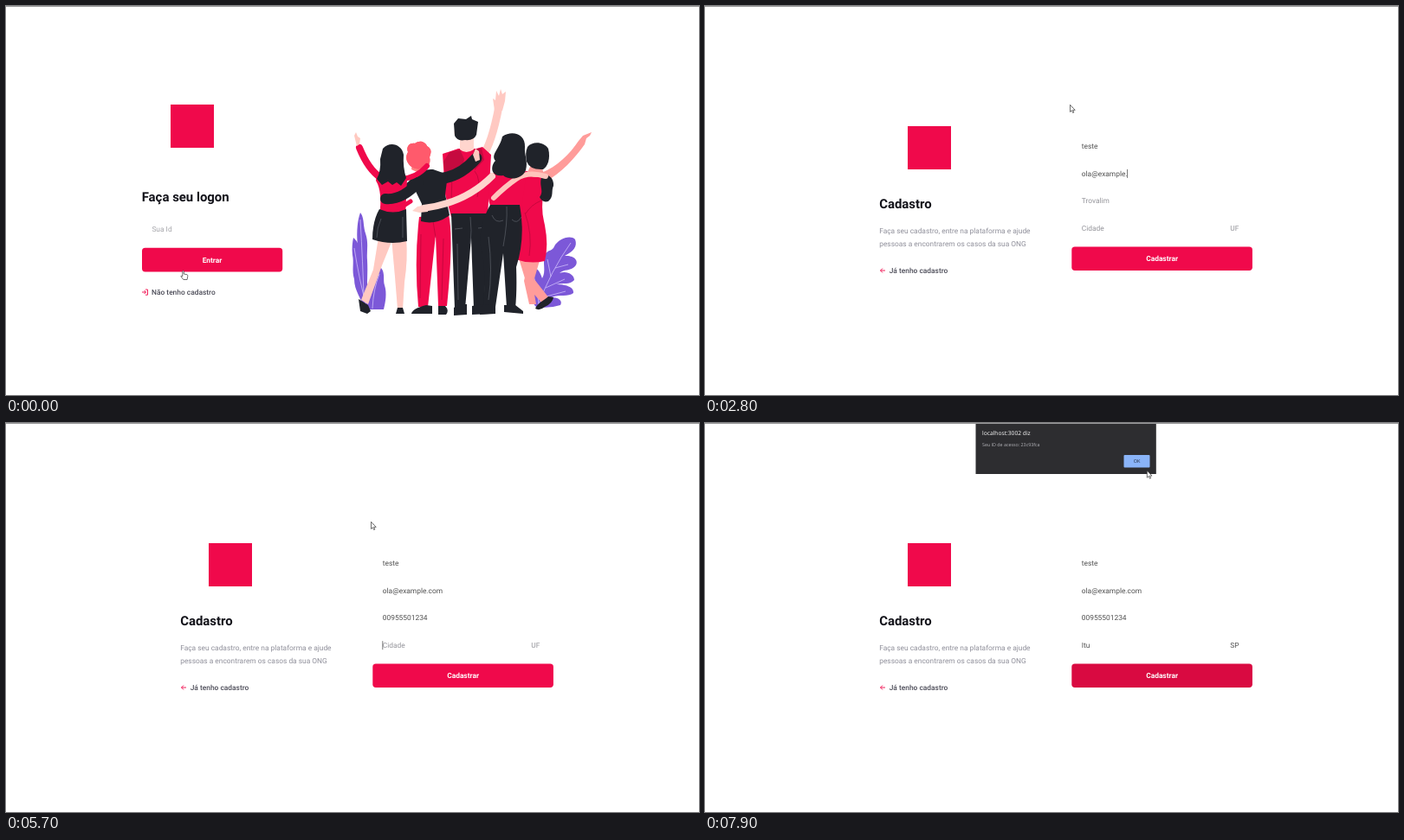
An HTML page for the animation above (8 s loop, 800 px wide and 450 px high).

```html
<!DOCTYPE html>
<html lang="pt">
<head>
<meta charset="utf-8">
<style>
html, body { margin: 0; width: 100%; height: 100%; overflow: hidden; background: #fff; }
svg { display: block; width: 800px; height: 450px; }
text { font: 400 8.4px Roboto, sans-serif; fill: #737380; white-space: pre; text-rendering: geometricPrecision; }
.title { font-size: 14.93px; font-weight: 700; fill: #13131a; }
.link { font-weight: 500; fill: #4b4b57; }
.button { font-weight: 700; fill: #fff; text-anchor: middle; }
.body { fill: #8f8f9a; }
.field { fill: #939399; }
.field.typed { fill: #505050; }
#dialog text { font-family: "Open Sans", sans-serif; }
.icon { fill: none; stroke: #f0094b; stroke-width: .9; }
.red { fill: #f0094b; } .shade { fill: #c60a3f; } .dark { fill: #20232a; } .purple { fill: #7c58d8; }
.peach { fill: #ffc9c0; } .pale { fill: #ffd5cd; } .coral { fill: #ff9c9a; }
.limb { fill: none; stroke-linecap: round; stroke-linejoin: round; }
.seam { fill: none; stroke: #666a73; stroke-width: .6; }
.fold { fill: none; stroke: #b50638; stroke-width: .7; }
.vein { fill: none; stroke: #d8cbff; stroke-width: .7; }
</style>
</head>
<body>
<svg viewBox="0 0 800 450">
  <defs>
    <pattern id="dots" width="3" height="3" patternUnits="userSpaceOnUse" patternTransform="rotate(30)">
      <circle cx="1" cy="1" r=".45" fill="#e02a50"/>
    </pattern>
  </defs>

  <g id="login">
    <rect class="red" x="190" y="114" width="50" height="50"/>
    <text class="title" x="156.7" y="226.2">Faça seu logon</text>
    <text x="168.4" y="261.2" style="fill:#a5a5aa">Sua Id</text>
    <rect class="red" x="157" y="279.8" width="162.2" height="27.6" rx="3.7"/>
    <text class="button" x="238" y="296.6">Entrar</text>
    <path class="icon" d="M161 328h2.500v6.200h-2.500M157 331h4.500M159.500 329l2 2-2 2"/>
    <text class="link" x="168" y="334.1">Não tenho cadastro</text>

    <g id="leaves">
      <path class="purple" d="M409 239C414 245 412 255 415 263C419 275 416 283 417 294C418 312 416 330 416 346L411 320C406 306 405 294 407 283C404 268 405 250 409 239Z"/>
      <path class="purple" d="M401 268C406 272 409 279 409 287C414 296 412 306 415 315C420 327 421 340 419 351H414C410 338 402 329 402 316C399 306 402 297 400 288C399 280 400 273 401 268Z"/>
      <path class="purple" d="M433 303C438 309 435 317 437 323C440 332 438 343 436 351H415C413 340 417 331 419 323C421 312 427 306 433 303Z"/>
      <path class="vein" d="M409 247Q412 300 413 336M402 280Q408 318 416 347M431 310Q424 328 423 350"/>
      <path class="purple" d="M612 348C605 341 612 336 607 328C603 318 604 307 609 304C614 302 617 309 619 315C624 306 619 298 622 288C626 281 631 284 633 278C637 270 651 264 657 270C660 278 655 284 645 289C656 288 662 295 657 301C652 307 644 304 639 309C648 306 656 311 656 317C651 323 643 320 635 322C646 322 656 325 655 332C649 337 639 333 630 337C638 337 643 341 640 346Q628 350 612 348Z"/>
      <path class="vein" d="M614 347Q629 306 652 274M629 313L625 293M634 303L649 299M623 326L645 316M620 337L646 330M615 345Q613 325 609 312"/>
    </g>

    <g id="friend5">
      <path class="coral" d="M592 292H604L609 315 627 338 620 345 602 325ZM604 291H617L608 322 612 345H604L598 318Z"/>
      <path class="dark" d="M611 350C614 343 621 341 626 336L632 337Q631 344 622 348Q616 353 611 350Z"/>
      <path class="coral" d="M618 193C636 186 651 171 661 156L666 150 676 146 674 150 670 153 668 160C657 176 641 193 622 204Z"/>
      <path class="red" d="M588 197L600 191 614 192 624 204Q616 228 621 249Q627 275 622 295Q605 299 588 293L587 244Z"/>
      <path class="coral" d="M607 182H617L621 194Q611 202 601 194Z"/>
      <path class="dark" d="M602 163C608 156 621 157 626 165C629 177 625 186 620 189Q605 190 601 180Q599 170 602 163Z"/>
      <path class="dark" d="M619 196C627 193 633 201 632 208C629 214 633 220 626 226Q619 228 616 221C622 214 614 207 619 196Z"/>
      <path class="fold" d="M600 240Q606 230 618 225M599 239Q608 264 604 289"/>
    </g>

    <g id="friend3">
      <path class="limb" d="M549 176Q561 159 569 116" stroke="#ffc9c2" stroke-width="9"/>
      <path d="M564 121L562 107 565 109 566 98 569 104 571 96 573 102 577 99 576 110 573 121Z" fill="#ffc9c2"/>
      <path class="red" d="M504 171L522 165H543L550 163 560 172 556 244H514L507 218Z"/>
      <path class="shade" d="M512 169L524 166 529 177 526 190 507 196 505 180ZM540 166L549 164 552 178 541 190Z"/>
      <path class="pale" d="M524 149H540V166Q531 172 524 166ZM519 142Q515 148 521 152Z"/>
      <path class="dark" d="M518 150L517 136 522 130 531 131 537 127 538 131 545 134 543 149Q540 156 530 155Q521 157 518 150Z"/>
      <path class="dark" d="M514 240H556L552 350H540L537 268 530 350H518Z"/>
      <path class="seam" d="M536 244Q538 260 536 275M518 258L527 257M545 257L554 256M521 275L522 340"/>
      <path class="dark" d="M517 358V349L523 345H532V357ZM538 357V347L550 345 559 356Z"/>
      <path class="fold" d="M541 191Q549 200 544 221M515 195L514 227"/>
    </g>

    <g id="friend2">
      <path class="red" d="M477 244L511 241Q517 268 509 347H499L496 265 487 348H476Q471 294 477 244Z"/>
      <path class="fold" d="M493 249L496 268M479 264L478 338M505 269L503 340"/>
      <path class="dark" d="M468 356Q469 350 485 346L492 347V356ZM499 347H507Q512 352 508 357H499Z"/>
      <path class="limb" d="M497 200Q523 199 543 176" stroke="#20232a" stroke-width="13"/>
      <path class="peach" d="M539 172L542 165 546 168 547 178 542 180Z"/>
      <path class="dark" d="M466 200Q476 188 493 189L510 195 507 218 512 242Q496 254 479 249L480 229Z"/>
      <path class="limb" d="M474 203Q456 222 442 224" stroke="#20232a" stroke-width="13"/>
      <path d="M469 180H486V189Q477 195 468 189Z" fill="#ff817f"/>
      <path id="curls" fill="#ff5a6c" d="M465 183C460 176 463 171 464 169C461 161 468 158 472 159C478 154 485 158 486 162C493 166 490 171 489 175C491 183 486 188 480 188Q470 190 465 183Z"/>
      <use href="#curls" style="fill:url(#dots)"/>
    </g>

    <g id="friend4">
      <path class="red" d="M557 194L583 190 600 199 595 235H560Q554 219 557 194Z"/>
      <path class="limb" d="M561 197Q530 228 482 234" stroke="#ffd5cd" stroke-width="8"/>
      <path class="pale" d="M486 230L475 232 469 237 477 239 487 238Z"/>
      <path class="limb" d="M623 197Q602 191 589 200T563 222" stroke="#ffc4bc" stroke-width="6"/>
      <path class="dark" d="M559 230H593Q600 268 589 302Q590 330 588 349H578L574 286 565 348H551Q555 299 547 275Q547 251 559 230Z"/>
      <path class="seam" d="M578 232Q579 251 574 278M561 242Q565 252 574 248M584 247Q590 253 595 244M557 267Q562 306 557 340"/>
      <path class="dark" d="M547 357V349Q554 343 565 346V356ZM575 354V346H588L597 353V356Z"/>
      <path class="dark" d="M573 151C584 143 600 148 599 163C598 172 603 179 600 190C595 202 579 201 574 196C559 198 559 185 565 179C559 172 570 165 573 151Z"/>
    </g>

    <g id="friend1">
      <path class="limb" d="M433 199Q418 189 408 164" stroke="#f0094b" stroke-width="8"/>
      <path class="peach" d="M405 162L402 150 404 146 406 151 409 153 408 160Z"/>
      <path id="legs" class="peach" d="M430 268H447L434 300 418 345 410 340 424 305ZM445 268H462Q464 294 460 319L458 350H452L449 313Z"/>
      <use href="#legs" style="fill:url(#dots)" opacity=".2"/>
      <path class="red" d="M428 193L457 188 463 201 461 244H431Q435 215 427 202Z"/>
      <path class="limb" d="M456 200Q474 199 486 185" stroke="#f0094b" stroke-width="6"/>
      <path class="limb" d="M476 204Q457 225 438 223" stroke="#20232a" stroke-width="12"/>
      <path class="limb" d="M435 232Q449 239 467 226" stroke="#f0094b" stroke-width="5"/>
      <path class="dark" d="M431 235Q447 242 462 235L463 272Q443 277 423 270Q423 249 431 235Z"/>
      <path class="seam" d="M433 246Q428 257 428 268M458 244L458 268"/>
      <path class="dark" d="M435 165C443 156 457 160 459 172Q458 187 462 199L456 208 451 204 446 207 441 203 434 207 428 200Q433 191 432 177Z"/>
      <path class="dark" d="M407 339L418 346 421 353 417 356 409 353ZM452 349H458L460 356H450Z"/>
    </g>
  </g>

  <g id="signup">
    <rect class="red" x="234" y="139" width="50" height="50"/>
    <text class="title" x="201.2" y="234.3">Cadastro</text>
    <text class="body" x="201.2" y="263">Faça seu cadastro, entre na plataforma e ajude</text>
    <text class="body" x="201.2" y="278">pessoas a encontrarem os casos da sua ONG</text>
    <path class="icon" d="M208 306h-5.500M205 303.500l-2.500 2.500 2.500 2.500"/>
    <text class="link" x="212.700" y="309">Já tenho cadastro</text>
    <g id="fields"></g>
    <rect id="caret" width=".7" height="10" fill="#444"/>
    <rect id="submit" class="red" x="423.300" y="278.400" width="208.600" height="27.600" rx="3.700"/>
    <text class="button" x="527.600" y="295.200">Cadastrar</text>
  </g>

  <g id="dialog">
    <rect x="312.500" y="-10" width="208.300" height="69" fill="#2d2d30"/>
    <text x="320" y="13.800" style="font-size:6.7px;fill:#fff">localhost:3002 diz</text>
    <text x="320" y="26.800" style="font-size:5.33px;fill:#b4b4b9">Seu ID de acesso: 23c93fca</text>
    <rect x="483.500" y="37" width="30" height="14.500" rx="1" fill="#8ab4f8"/>
    <text x="498.500" y="46.200" text-anchor="middle" style="font-size:5.5px;fill:#202b40">OK</text>
  </g>

  <rect width="800" height="1" fill="#98989a"/>
  <g id="cursor" stroke="#333" stroke-width=".7" stroke-linejoin="round" fill="#fff">
    <path id="arrow" d="M0 0V8.200L1.900 6.500 3.200 9.300 4.400 8.700 3.200 6.100H5.700Z"/>
    <path id="hand" d="M-.7 .8Q0-.5 .8 .8V4L4.500 4.700Q5.500 5 5.300 6.500L4.600 10.500H.3L-2.600 6.800Q-2.500 5.500-.7 6.700Z"/>
  </g>
</svg>
<script>
const LOOP = 8000;
const $ = id => document.getElementById(id);
const show = (id, on) => $(id).style.display = on ? "" : "none";

// keys holds [time, number of characters typed]
const everyStep = (start, count) => Array.from({ length: count }, (_, i) => [start + i * 100, i + 1]);
const fields = [
  { x: 434.8, y: 165, hint: "Nome da ONG", value: "teste", focus: 900, keys: everyStep(1000, 5) },
  { x: 434.8, y: 196.7, hint: "E-mail", value: "ola@example.com", focus: 1500,
    keys: [[1800, 2], [1900, 4], [2000, 5], [2200, 6], [2400, 8], [2500, 10], [2600, 11], [2800, 12], [2900, 14], [3000, 15]] },
  { x: 434.8, y: 228.2, hint: "Trovalim", value: "00955501234", focus: 3200, keys: everyStep(4300, 11) },
  { x: 434.8, y: 260, hint: "Cidade", value: "Itu", focus: 5500, keys: [[5900, 1], [6100, 2], [6200, 3]] },
  { x: 606.3, y: 260, hint: "UF", value: "SP", focus: 6400, keys: [[6600, 1], [6700, 2]] }
];
for (const field of fields) {
  field.node = document.createElementNS("http://www.w3.org/2000/svg", "text");
  field.node.setAttribute("x", field.x);
  field.node.setAttribute("y", field.y);
  $("fields").append(field.node);
}

const cursorPath = [
  [0, 204.5, 306], [100, 205, 313], [200, 210, 328], [300, 214, 330], [400, 376.5, 292.5],
  [700, 440, 162], [900, 442, 160], [1300, 421.5, 114.3], [7000, 421.5, 114.3],
  [7300, 519.5, 296], [7600, 519.5, 296], [7900, 510.3, 55]
];
function cursorAt(t) {
  const next = cursorPath.findIndex(point => point[0] > t);
  if (next < 0) return cursorPath.at(-1).slice(1);
  const [t0, x0, y0] = cursorPath[next - 1], [t1, x1, y1] = cursorPath[next];
  const k = (t - t0) / (t1 - t0);
  return [x0 + (x1 - x0) * k, y0 + (y1 - y0) * k];
}

function drawFields(t) {
  for (const { node, keys, value, hint } of fields) {
    const count = keys.findLast(key => key[0] <= t)?.[1] ?? 0;
    node.textContent = count ? value.slice(0, count) : hint;
    node.setAttribute("class", count ? "field typed" : "field");
  }
  const active = fields.findLast(field => field.focus <= t);
  const blinkedOff = (t >= 3500 && t < 3700) || (t >= 4000 && t < 4300);
  const visible = active && t < 7200 && !blinkedOff;
  show("caret", visible);
  if (!visible) return;
  const typed = active.node.classList.contains("typed");
  $("caret").setAttribute("x", active.x - .3 + (typed ? active.node.getComputedTextLength() : 0));
  $("caret").setAttribute("y", active.y - 7.8);
}

function draw(now) {
  const t = Math.floor(now % LOOP / 100) * 100;
  const onLogin = t < 300;
  show("login", onLogin);
  show("signup", !onLogin);
  if (!onLogin) drawFields(t);

  $("submit").style.fill = t >= 7300 ? "#d90a41" : "";
  const opening = Math.min(1, Math.max(0, (t - 7400) / 300));
  $("dialog").setAttribute("opacity", opening < .5 ? opening * .45 : opening);
  $("dialog").setAttribute("transform", `translate(0 ${-10.5 * (1 - opening)})`);

  const pointing = onLogin || (t >= 7300 && t <= 7600);
  show("hand", pointing);
  show("arrow", !pointing);
  $("cursor").setAttribute("transform", `translate(${cursorAt(t)})`);
}

const start = performance.now();
function tick() {
  draw(performance.now() - start);
  requestAnimationFrame(tick);
}
tick();
</script>
</body>
</html>
```
